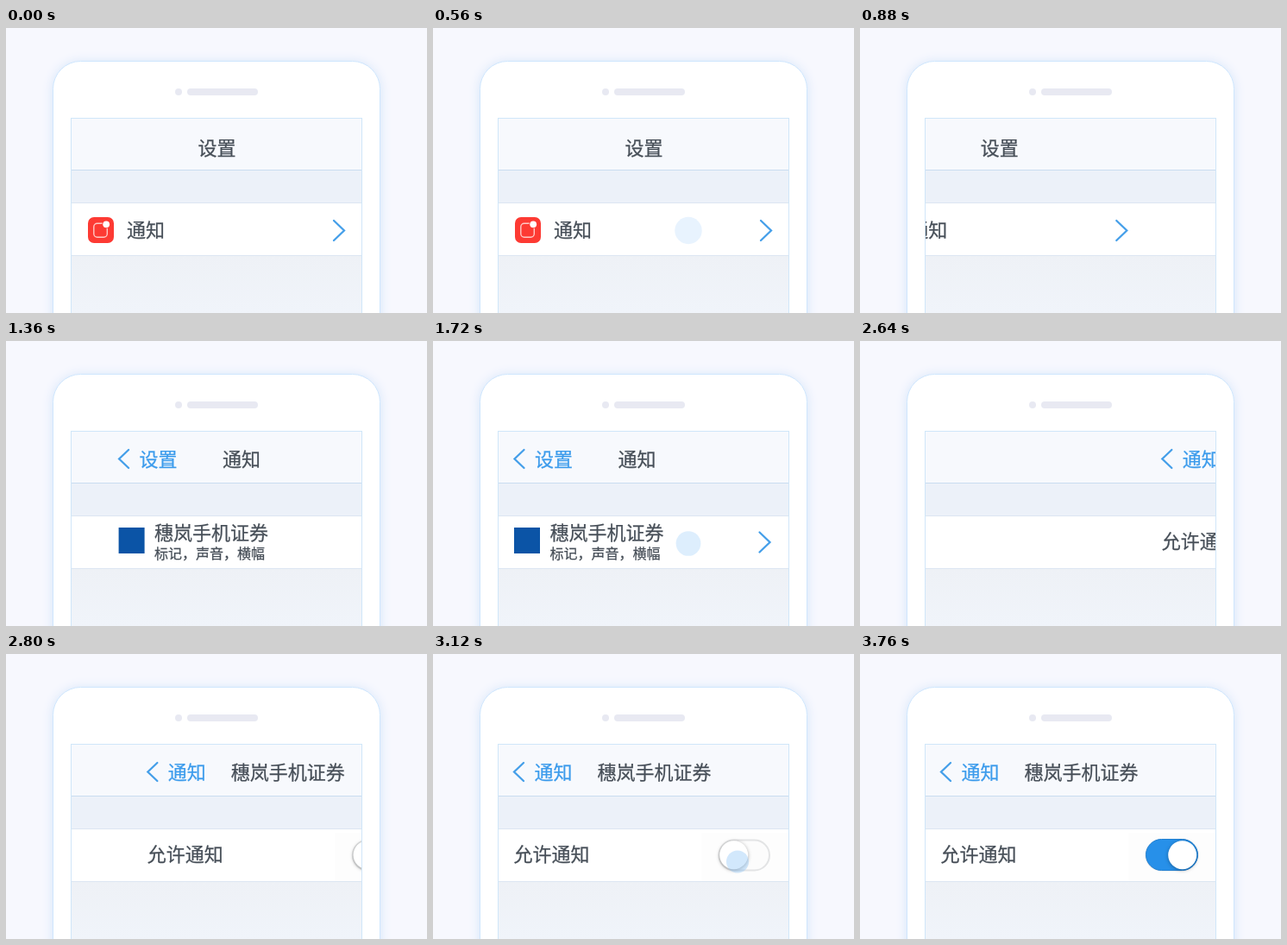
Recreate the animation shown at these times as an HTML page. Size 488 by 330 pixels, loop 4600 ms.

```html
<!DOCTYPE html>
<html lang="zh-CN">
<head>
<meta charset="utf-8">
<title>通知设置</title>
<style>
  html, body { margin: 0; width: 100%; height: 100%; overflow: hidden; background: #f7f8fe; }
  svg { display: block; width: 488px; height: 330px; }
  text {
    font: 22px "Noto Sans CJK SC", "Noto Sans CJK", sans-serif;
    fill: #464e57; stroke: #464e57; stroke-width: 0.25;
  }
  .small { font-size: 16px; }
  .link { fill: #3b9bec; stroke: #3b9bec; }
  .chevron { fill: none; stroke: #459fe9; stroke-width: 2.3; stroke-linecap: round; }
  .phone { fill: #fff; stroke: #cfe6fd; filter: drop-shadow(0 1px 6px #d3e4fa); }
  .thumb { fill: #fff; filter: drop-shadow(0 1px 2px #0005); }
</style>
</head>
<body>
<svg viewBox="0 0 488 330">
  <defs>
    <clipPath id="screen"><rect x="76" y="105" width="336" height="225"/></clipPath>
    <linearGradient id="floor" x2="0" y2="1">
      <stop stop-color="#eef1f6"/><stop offset="1" stop-color="#f0f4fa"/>
    </linearGradient>
  </defs>

  <rect class="phone" x="54.5" y="38.5" width="379" height="400" rx="32"/>
  <g fill="#e8e9f2">
    <circle cx="200" cy="74" r="4"/>
    <rect x="210" y="70" width="82" height="8" rx="4"/>
  </g>

  <rect x="76" y="105" width="336" height="59" fill="#f7f9fd"/>
  <rect x="76" y="165" width="336" height="37" fill="#ecf1f9"/>
  <rect x="76" y="203" width="336" height="60" fill="#fff"/>
  <rect x="76" y="264" width="336" height="66" fill="url(#floor)"/>
  <path d="M76 164.5H412" stroke="#c9dcf0"/>
  <path d="M76 202.5H412M76 263.5H412" stroke="#dce6f2"/>
  <rect x="75.5" y="104.5" width="337" height="300" fill="none" stroke="#d0e6f9"/>

  <g clip-path="url(#screen)">
    <g class="page">
      <text x="222.5" y="147.2">设置</text>
      <rect x="95" y="219" width="30" height="30" rx="7" fill="#fd3a33"/>
      <rect x="101.8" y="226.2" width="15.5" height="16" rx="4" fill="none" stroke="#ffc9c5" stroke-width="1.4"/>
      <circle cx="116.2" cy="227.3" r="4.8" fill="#fd3a33"/>
      <circle cx="116.2" cy="227.3" r="3.9" fill="#fff"/>
      <text x="140" y="242.2">通知</text>
      <path class="chevron" d="M380 223l12 11.5l-12 11.5"/>
    </g>

    <g class="page">
      <path class="chevron" d="M105.5 126l-11 10.5l11 10.5"/>
      <text class="link" x="118" y="145">设置</text>
      <text x="214.5" y="145">通知</text>
      <rect x="94" y="216" width="30" height="30" fill="#0b54a6"/>
      <text x="135.5" y="230">穗岚手机证券</text>
      <text class="small" x="135.5" y="252">标记，声音，横幅</text>
      <path class="chevron" d="M378.5 221.5l12 11.5l-12 11.5"/>
    </g>

    <g class="page">
      <path class="chevron" d="M105 126l-11 10.5l11 10.5"/>
      <text class="link" x="117.5" y="144.8">通知</text>
      <text x="190.5" y="144.8">穗岚手机证券</text>
      <text x="93.5" y="240.4">允许通知</text>
      <rect x="311" y="207" width="101" height="56" fill="#fdfdfd"/>
      <rect x="331.5" y="215.5" width="58.5" height="35" rx="17.5" fill="#fcfcfc" stroke="#e3e4e5" stroke-width="2"/>
      <rect id="track" x="331.5" y="214.5" width="60" height="36" rx="18" fill="#2790e9" stroke="#2381d2"/>
      <circle id="thumb" class="thumb" cy="232.7" r="16.5"/>
    </g>

    <circle id="tap" fill="#8fc6f7"/>
  </g>
</svg>
<script>
  const LOOP = 4600, SLIDE = 431, WIDTH = 338;
  const pages = [...document.querySelectorAll('.page')];
  const [track, thumb, tap] = ['track', 'thumb', 'tap'].map(id => document.getElementById(id));

  const visits = [
    { enter: -SLIDE, leave: 739 },
    { enter: 1022, leave: 2155 },
    { enter: 2500, leave: Infinity },
  ];
  const taps = [
    { start: 320, length: 400, x: 296, y: 234.5 },
    { start: 1600, length: 400, x: 296, y: 234.5 },
    { start: 3120, length: 360, x: 353, y: 240.5 },
  ];

  const progress = (t, start, length) => Math.min(1, Math.max(0, (t - start) / length));
  const ease = p => (1 - Math.cos(Math.PI * p)) / 2;
  const set = (node, attributes) => {
    for (const name in attributes) node.setAttribute(name, attributes[name]);
  };

  function draw(t) {
    visits.forEach(({ enter, leave }, i) => {
      const x = WIDTH * (1 - ease(progress(t, enter, SLIDE)) - ease(progress(t, leave, SLIDE)));
      set(pages[i], { transform: `translate(${x})` });
    });

    const active = taps.find(({ start, length }) => t >= start && t < start + length);
    if (active) {
      const p = progress(t, active.start, active.length);
      set(tap, { cx: active.x, cy: active.y, r: 13 + 4.5 * p, opacity: 0.4 - 0.32 * p });
    } else {
      set(tap, { opacity: 0 });
    }

    const on = ease(progress(t, 3640, 120));
    set(track, { opacity: on });
    set(thumb, { cx: 348.7 + 25 * on });
  }

  function frame() {
    draw(performance.now() % LOOP);
    requestAnimationFrame(frame);
  }
  frame();
</script>
</body>
</html>
```
